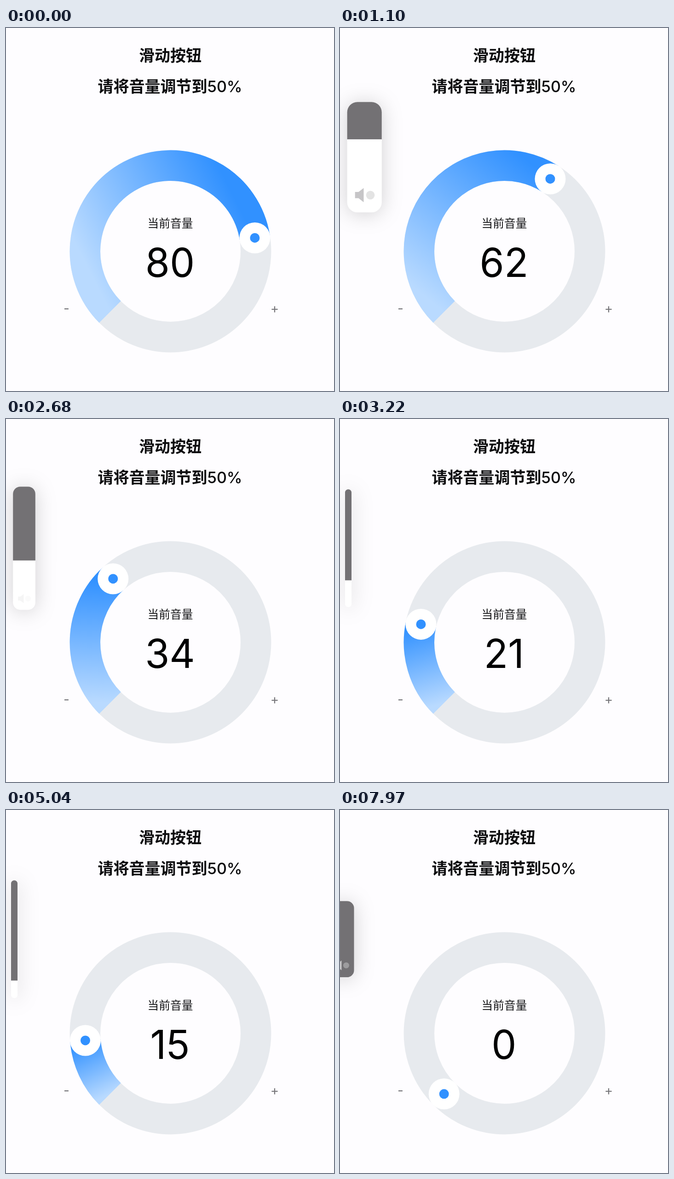
An HTML page for the animation above (8000 ms loop, 713x786 px).

```html
<!DOCTYPE html>
<html lang="zh-CN">
<head>
<meta charset="utf-8">
<style>
  html, body { margin: 0; width: 100%; height: 100%; overflow: hidden; background: #fefdff; }
  svg { display: block; width: 100vw; height: 100vh; }
  text { font-family: Inter, "Noto Sans CJK SC", "Noto Sans CJK", sans-serif; text-anchor: middle; }
  .title { font-size: 34px; font-weight: 700; fill: #0c0c0e; }
  .title tspan { font-weight: 550; }
  .label { font-size: 24.7px; fill: #161618; }
  .number { font-size: 86px; fill: #000; }
  .sign { font-size: 28px; fill: #77777b; }
  #hud { filter: drop-shadow(0 3px 22px rgba(0, 0, 0, .18)); }
</style>
</head>
<body>
<svg viewBox="0 0 713 786">
  <defs>
    <linearGradient id="blue" gradientUnits="userSpaceOnUse">
      <stop offset="0" stop-color="#b9daff"/>
      <stop offset="1" stop-color="#3191ff"/>
    </linearGradient>
    <clipPath id="hudClip"><rect id="hudShape"/></clipPath>
  </defs>

  <text class="title" x="357" y="71.5">滑动按钮</text>
  <text class="title" x="356.5" y="138.8">请将音量调节到<tspan>50%</tspan></text>

  <circle cx="357.5" cy="483.5" r="185.7" fill="none" stroke="#e7eaee" stroke-width="66.5"/>
  <path id="arc" fill="none" stroke="url(#blue)" stroke-width="66.5"/>
  <g id="knob">
    <circle r="33.5" fill="#fff"/>
    <circle r="10.5" fill="#3191ff"/>
  </g>

  <text class="label" x="357" y="431.7">当前音量</text>
  <text class="number" id="number" x="356.5" y="538.7"></text>
  <text class="sign" x="131.5" y="616.5">-</text>
  <text class="sign" x="584" y="616.5">+</text>

  <g id="hud">
    <g clip-path="url(#hudClip)">
      <rect x="-60" y="100" width="240" height="360" fill="#fff"/>
      <rect id="hudDark" x="-60" y="100" width="240" fill="#737174"/>
      <g id="icons">
        <path d="M-24-8h9l13-10v36l-13-10h-9z" fill="#c6c5c7"/>
        <circle cx="15" r="11" fill="#c8c8c8" opacity=".5"/>
      </g>
    </g>
  </g>
</svg>
<script>
const LOOP = 8000, CX = 357.5, CY = 483.5, RADIUS = 185.7, HUD_Y = 279.8;
const $ = id => document.getElementById(id);
const set = (id, attrs) => {
  for (const name in attrs) $(id).setAttribute(name, attrs[name]);
};
const clamp = x => Math.min(1, Math.max(0, x));
const mix = (a, b, p) => a + (b - a) * p;
const progress = (t, start, length) => clamp((t - start) / length);
const smooth = p => p * p * (3 - 2 * p);

// Dragged volume: [time, percent]
const DRAG = [
  [0, 80], [850, 80], [980, 66], [1100, 62], [1640, 61], [1960, 50.7], [2080, 46],
  [2300, 42], [2500, 41.5], [2560, 40], [2680, 34.4], [3000, 24], [3320, 19.9],
  [3780, 19.5], [3900, 17.6], [4250, 14.9], [7620, 14.9], [7845, 0], [LOOP, 0]
];

function volumeAt(t) {
  t = Math.max(0, t);
  const i = DRAG.findIndex(([time]) => time > t);
  const [t0, v0] = DRAG[i - 1], [t1, v1] = DRAG[i];
  return mix(v0, v1, (t - t0) / (t1 - t0));
}

function pointAt(volume) {
  const angle = (135 + 2.7 * volume) * Math.PI / 180;
  return [CX + RADIUS * Math.cos(angle), CY + RADIUS * Math.sin(angle)];
}

function drawDial(volume) {
  const [x1, y1] = pointAt(0), [x2, y2] = pointAt(volume);
  const large = volume * 2.7 > 180 ? 1 : 0;
  set('arc', {
    d: `M${x1} ${y1}A${RADIUS} ${RADIUS} 0 ${large} 1 ${x2} ${y2}`,
    visibility: volume > 0 ? 'visible' : 'hidden'
  });
  set('blue', { x1, y1, x2, y2 });
  set('knob', { transform: `translate(${x2} ${y2})` });
  $('number').textContent = Math.round(volume);
}

function hudBox(t) {
  if (t < 2500 || t > 7000) {
    // Slides in from the left edge while growing
    const grow = 1 - (1 - progress(t, t > 7000 ? 7932 : 951, 420)) ** 3;
    const scale = mix(.45, 1, grow);
    return { x: Math.min(64, -21 + 101 * grow), w: 88 * scale, h: 280 * scale, r: 26 * scale, shown: grow > 0 };
  }
  // Narrows to a thin bar, then leaves
  const thin = smooth(progress(t, 2560, 232));
  const leave = smooth(progress(t, 6460, 300));
  return {
    x: mix(64, 18, thin) - 45 * leave,
    w: mix(88, 14, thin), h: mix(280, 255, thin), r: mix(26, 7, thin), shown: leave < 1
  };
}

function drawHud(t) {
  const { x, w, h, r, shown } = hudBox(t);
  const level = volumeAt(t - 123) / 100, top = HUD_Y - h / 2, scale = w / 88;
  set('hud', { visibility: shown ? 'visible' : 'hidden' });
  set('hudShape', { x: x - w / 2, y: top, width: w, height: h, rx: r });
  set('hudDark', { height: top + h * (1 - level) - 100 });
  set('icons', {
    transform: `translate(${x} ${top + h - 44 * scale}) scale(${scale})`,
    opacity: t > 2500 && t < 7000 ? clamp((w - 40) / 48) : 1
  });
}

function frame(now) {
  const t = now % LOOP;
  drawDial(volumeAt(t));
  drawHud(t);
  requestAnimationFrame(frame);
}
frame(0);
</script>
</body>
</html>
```
